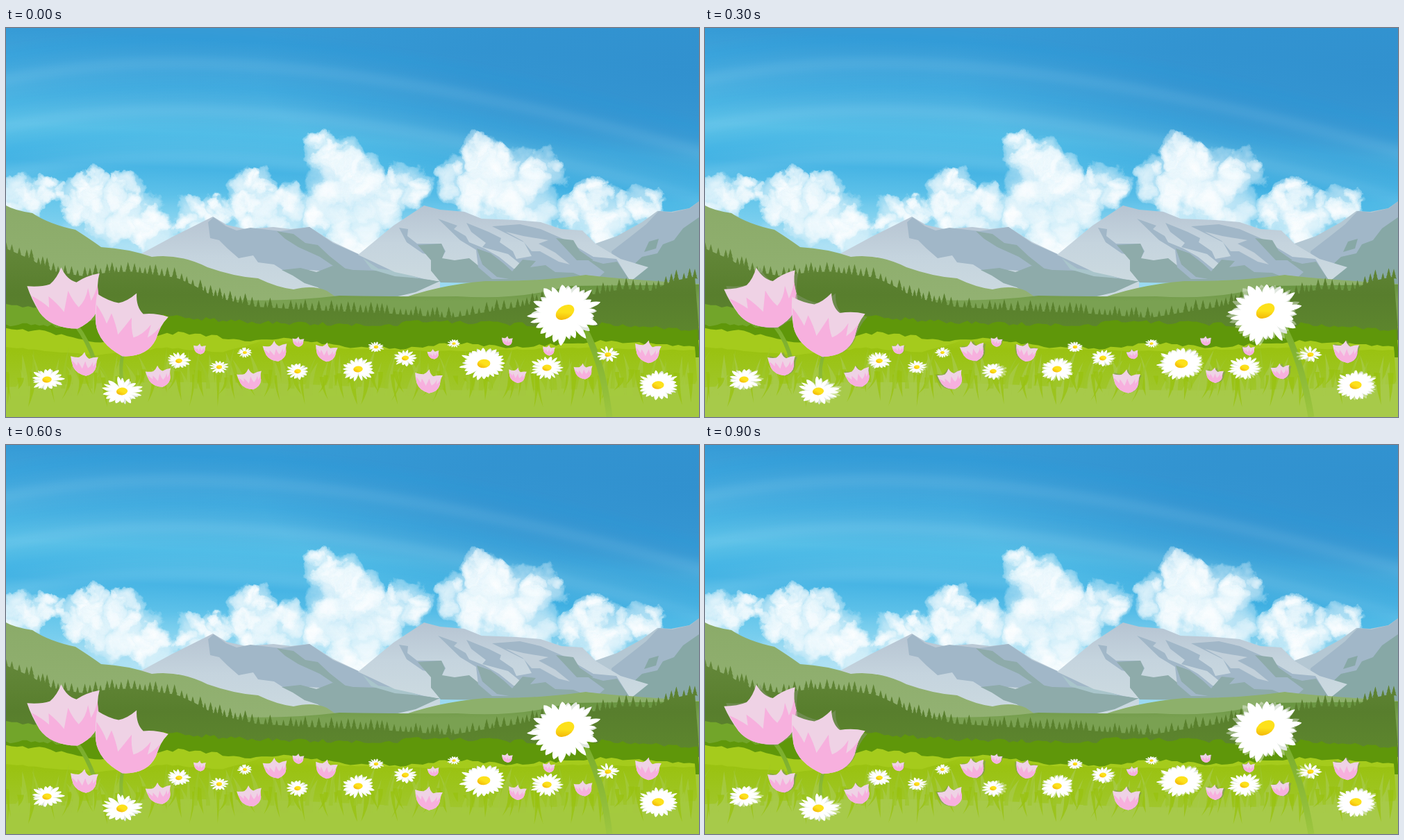
These frames come from a looping animation (998x561 px, 1 s). An HTML page:

```html
<!DOCTYPE html>
<html lang="en">
<head>
<meta charset="utf-8">
<title>Spring meadow</title>
<style>
  html, body { margin: 0; width: 100%; height: 100%; overflow: hidden; background: #a4c93f; }
  svg { position: absolute; left: 0; top: 0; width: 100%; height: 100%; }
</style>
</head>
<body>
<svg viewBox="0 0 998 561" preserveAspectRatio="none">
  <defs>
    <linearGradient id="sky" x1="0" y1="0" x2="0" y2="325" gradientUnits="userSpaceOnUse" gradientTransform="rotate(3)">
      <stop offset="0" stop-color="#369bd6"/><stop offset=".15" stop-color="#40a6dc"/>
      <stop offset=".28" stop-color="#4bb1e1"/><stop offset=".42" stop-color="#57bfe7"/>
      <stop offset=".58" stop-color="#46b4e4"/><stop offset=".78" stop-color="#6cc9ec"/>
      <stop offset="1" stop-color="#9bdaf2"/>
    </linearGradient>
    <radialGradient id="deep" cx="998" cy="60" r="640" gradientUnits="userSpaceOnUse" gradientTransform="matrix(1 0 0 .3 0 42)">
      <stop offset="0" stop-color="#3191cf"/><stop offset=".5" stop-color="#3191cf" stop-opacity=".75"/>
      <stop offset="1" stop-color="#3191cf" stop-opacity="0"/>
    </radialGradient>
    <radialGradient id="puff">
      <stop offset="0" stop-color="#fff" stop-opacity=".62"/><stop offset=".65" stop-color="#f4fbfe" stop-opacity=".5"/>
      <stop offset=".9" stop-color="#e4f5fc" stop-opacity=".34"/><stop offset="1" stop-color="#dff3fb" stop-opacity="0"/>
    </radialGradient>
    <linearGradient id="haze" x1="0" y1="0" x2="0" y2="1">
      <stop offset="0" stop-color="#fff" stop-opacity="0"/><stop offset="1" stop-color="#fff" stop-opacity=".6"/>
    </linearGradient>
    <linearGradient id="rock" x1="0" y1="0" x2="0" y2="1">
      <stop offset="0" stop-color="#b6c4d2"/><stop offset=".5" stop-color="#c5d4de"/><stop offset="1" stop-color="#ccdae0"/>
    </linearGradient>
    <linearGradient id="hill" x1="0" y1="0" x2="0" y2="1">
      <stop offset="0" stop-color="#8bab69"/><stop offset="1" stop-color="#93b273"/>
    </linearGradient>
    <linearGradient id="dale" x1="0" y1="0" x2="0" y2="1">
      <stop offset="0" stop-color="#67943f"/><stop offset=".4" stop-color="#7aa152"/><stop offset="1" stop-color="#7aa152"/>
    </linearGradient>
    <linearGradient id="wood" x1="0" y1="300" x2="0" y2="440" gradientUnits="userSpaceOnUse">
      <stop offset="0" stop-color="#66893c"/><stop offset=".6" stop-color="#587e2d"/><stop offset="1" stop-color="#5d862d"/>
    </linearGradient>
    <linearGradient id="field" x1="0" y1="440" x2="0" y2="561" gradientUnits="userSpaceOnUse">
      <stop offset="0" stop-color="#a6cb1a"/><stop offset=".2" stop-color="#9ac211"/>
      <stop offset=".4" stop-color="#9cc41b"/><stop offset="1" stop-color="#a4c93f"/>
    </linearGradient>
    <linearGradient id="stem" x1="0" y1="430" x2="0" y2="561" gradientUnits="userSpaceOnUse">
      <stop offset="0" stop-color="#78ac2c"/><stop offset="1" stop-color="#9dc640"/>
    </linearGradient>
    <linearGradient id="yolk" x1="1" y1="0" x2="0" y2="1">
      <stop offset=".5" stop-color="#fde11b"/><stop offset="1" stop-color="#efa700"/>
    </linearGradient>
    <filter id="fluff" x="-5%" y="-20%" width="110%" height="140%">
      <feTurbulence type="fractalNoise" baseFrequency=".035" numOctaves="4" seed="8"/>
      <feDisplacementMap in="SourceGraphic" scale="30" xChannelSelector="R" yChannelSelector="G"/>
    </filter>
    <filter id="soft" x="-5%" y="-20%" width="110%" height="140%"><feGaussianBlur stdDeviation="5"/></filter>
  </defs>
  <g id="scene"></g>
</svg>
<svg viewBox="0 0 998 561" preserveAspectRatio="none"><g id="poseA"></g><g id="poseB"></g></svg>
<script>
let seed = 1;
const rand = (a = 0, b = 1) => {
  seed = (seed * 16807) % 2147483647;
  return a + (b - a) * seed / 2147483647;
};
const n1 = v => v.toFixed(1);
const path = (d, fill, more = '') => `<path d="${d}" fill="${fill}" ${more}/>`;
const times = (n, f) => Array.from({ length: n }, (_, i) => f(i)).join('');

// height of a polyline [x, y, x, y, ...] at x
function level(pts, x) {
  let i = 0;
  while (i < pts.length - 4 && pts[i + 2] < x) i += 2;
  const [x0, y0, x1, y1] = pts.slice(i, i + 4);
  return y0 + (y1 - y0) * (x - x0) / (x1 - x0);
}

function band(pts, floor, fill, rough = 0, step = 8) {
  const end = pts[pts.length - 2];
  let d = `M${pts[0]} ${floor}`;
  for (let x = pts[0]; x <= end; x += step) d += `L${x} ${n1(level(pts, x) + rand(-rough, rough))}`;
  return path(d + `L${end} ${floor}Z`, fill);
}

// conifers standing along a line
function forest(pts, floor, fill, tall) {
  let out = band(pts, floor, fill);
  for (let x = pts[0]; x < pts[pts.length - 2]; x += rand(6, 11)) {
    const y = level(pts, x), h = tall * rand(.5, 1.1), w = h * .38;
    let left = '', right = '';
    for (let k = 1; k < 5; k++) {
      const a = w * k / 4, yy = y - h + h * k / 3;
      right += `L${n1(x + a)} ${n1(yy)}L${n1(x + a * .65)} ${n1(yy - 1)}`;
      left = `L${n1(x - a * .65)} ${n1(yy - 1)}L${n1(x - a)} ${n1(yy)}` + left;
    }
    out += path(`M${n1(x)} ${n1(y - h)}${right}${left}Z`, fill);
  }
  return out;
}

function sky() {
  const streaks = times(6, i => {
    const y = 25 + i * 34;
    return `<path d="M-20 ${y + 20}C250 ${y - 45} 600 ${y + 5} 1018 ${y + 125}" fill="none" stroke="${i % 2 ? '#fff' : '#2c9bd8'}" stroke-width="18" opacity=".07"/>`;
  });
  return `<rect width="998" height="400" fill="url(#sky)"/><rect width="998" height="300" fill="url(#deep)"/>
    <g filter="url(#soft)">${streaks}</g>`;
}

const puffs = [
  20, 250, 38, 62, 232, 24, 108, 244, 36, 128, 230, 26, 172, 234, 31, 150, 268, 42, 195, 275, 38, 215, 295, 34,
  268, 274, 30, 300, 265, 24, 345, 232, 30, 365, 219, 22, 352, 262, 38, 400, 262, 40, 455, 172, 27, 484, 180, 30,
  475, 215, 44, 515, 210, 32, 530, 250, 50, 578, 228, 36, 465, 260, 42, 505, 298, 42, 680, 178, 27, 702, 190, 32,
  655, 218, 38, 725, 215, 48, 772, 206, 34, 690, 255, 46, 750, 250, 48, 838, 240, 30, 825, 265, 32, 870, 265, 38, 920, 255, 30, 860, 292, 32
];
function clouds() {
  let out = '';
  for (let i = 0; i < puffs.length; i += 3) {
    const [x, y, r] = puffs.slice(i, i + 3);
    const puff = (px, py, pr) => `<circle cx="${n1(px)}" cy="${n1(py)}" r="${n1(pr)}" fill="url(#puff)"/>`;
    out += puff(x, y, r);
    out += times(9, () => {
      const a = rand(0, 6.28), q = r * rand(.3, .75);
      return puff(x + q * Math.cos(a), y + q * Math.sin(a), r * rand(.25, .48));
    });
  }
  return `<g filter="url(#fluff)">${out}</g><ellipse cx="510" cy="290" rx="430" ry="55" fill="url(#haze)" filter="url(#soft)" opacity=".65"/>`;
}

function mountains() {
  const blue = '#a1b7c8', teal = '#8eabaa';
  return [
    ['M840 314L880 300L916 280L938 264L958 265L984 260L998 250V370H830Z', '#b4c7d3'],
    ['M872 322L898 302L922 283L940 264L960 266L985 260L998 250V360H875Z', blue],
    ['M998 273L975 289L962 306L946 312L938 325L916 330L900 345L850 350V370H998Z', '#87a8a6'],
    ['M919 323L926 308L940 304L936 318Z', '#87a8a6'],
    ['M190 328L240 301L298 272L318 284L345 290L385 287L410 290L437 287L470 308L510 327L560 350L625 366V390H190Z', 'url(#rock)'],
    ['M291 280L299 273L317 286L332 292L352 288L395 293L437 287L471 310L514 329L560 351L610 364L520 362L480 352L438 349L400 350L386 341L363 338L356 328L335 332L319 318L307 306L294 303Z', blue],
    ['M390 293L414 297L431 310L449 313L466 329L490 348L474 345L452 330L421 316L402 304Z', teal],
    ['M397 349L424 346L447 352L470 343L500 349L538 350L570 358L625 365L590 381L560 388H470L449 374L430 368L413 357Z', teal],
    ['M514 332L536 347L568 351L596 361L560 358L526 348Z', '#a9c5cb'],
    ['M507 327L558 285L602 256L625 262L660 265L685 275L735 277L770 280L800 290L830 292L850 312L885 333L925 345L900 365H620L560 352Z', 'url(#rock)'],
    ['M566 288L579 290L578 300L592 311L627 311L633 322L628 331L600 325L577 309Z', blue],
    ['M593 313L627 311L632 322L628 332L646 335L667 332L688 349L720 357L760 363L700 368L626 367L612 350L612 335Z', teal],
    ['M622 275L650 285L645 290L662 300L667 309L689 318L710 330L731 347L750 348L723 326L686 316L691 310L670 294L663 281L695 294L713 303L711 309L730 322L735 333L757 329L746 309L724 298L700 286L740 283L770 290L802 304L846 330L879 333L897 362H700L680 345L677 320L654 306Z', blue],
    ['M678 318L698 325L716 339L729 351L744 334L763 336L755 345L777 342L791 352L817 353L834 360L760 368L707 359L686 341Z', teal],
    ['M720 294L745 300L781 306L767 311L791 324L812 341L796 337L769 322L757 322L744 307Z', '#c2d0da'],
    ['M792 303L817 306L826 321L846 335L822 335L808 320Z', teal],
    ['M836 333L860 340L880 337L897 362L850 363L862 352Z', teal]
  ].map(([d, fill]) => path(d, fill)).join('');
}

const scene = () => sky() + clouds() + mountains() +
  path('M0 256Q12 263 38 267Q62 283 100 291Q122 305 137 316Q175 318 210 330Q250 325 290 345Q330 359 363 361Q390 374 414 377Q442 370 462 379L500 405H0Z', 'url(#hill)') +
  path('M560 394Q618 371 690 365Q767 366 835 356Q870 361 998 369V420H560Z', '#8db06b') +
  path('M330 392Q405 395 480 386Q570 388 650 387Q740 393 810 372L998 370V430H330Z', 'url(#dale)') +
  forest([0, 318, 30, 331, 65, 350, 110, 358, 145, 353, 180, 351, 245, 360, 270, 371, 300, 388, 360, 402, 440, 407, 540, 411, 640, 418, 690, 410, 740, 402, 790, 390, 855, 383, 890, 376, 930, 379, 960, 365, 999, 357], 450, 'url(#wood)', 15) +
  band([0, 400, 75, 405, 145, 410, 240, 421, 330, 427], 455, '#72a52a', 2) +
  band([0, 427, 75, 430, 130, 421, 215, 418, 230, 415, 330, 423, 430, 426, 555, 429, 590, 423, 690, 425, 780, 429, 870, 427, 999, 437], 475, '#5f970a', 3, 6) +
  band([0, 434, 60, 438, 125, 454, 190, 448, 250, 439, 305, 445, 345, 453, 400, 446, 485, 459, 570, 462, 650, 454, 730, 461, 860, 451, 999, 460], 561, '#a5cb1c', 2) +
  band([0, 460, 130, 472, 230, 461, 310, 468, 370, 451, 430, 452, 490, 463, 660, 466, 820, 461, 999, 465], 561, 'url(#field)', 1);

function grass(lean) {
  seed = 41;
  const blade = (x, y, tx, ty, w, fill) =>
    path(`M${n1(x - w)} ${n1(y)}Q${n1(x - w * .4)} ${n1((y + ty) / 2)} ${n1(tx)} ${n1(ty)}Q${n1(x + w)} ${n1((y + ty) / 2)} ${n1(x + w)} ${n1(y)}Z`, fill, 'opacity=".75"');
  const light = lean ? '#a7ca4a' : '#a4c93f';
  return path(`M0 518Q250 504 500 517T998 513V561H0Z`, light) +
    times(95, i => {
      const x = i * 10.7 + rand(-7, 7);
      return blade(x, 530, x + rand(-16, 16) + lean, rand(463, 502), rand(3, 8), light);
    }) +
    times(85, i => {
      const x = i * 12 + rand(-8, 8);
      return blade(x + rand(-14, 14) + lean * .5, rand(492, 506), x, rand(512, 547), rand(2, 5), '#98c10f');
    }) +
    times(28, i => {
      const x = i * 37 + rand(-15, 15);
      return blade(x, 520, x + rand(-20, 20) + lean, rand(458, 480), 3, '#9ec62b');
    });
}

const cup = 'M-53 0Q-34 5 -20 3Q-9 -3 0 -18Q5 1 18 7Q34 0 53 0Q45 16 46 36Q42 64 8 73Q-30 66 -42 40Q-50 20 -53 0Z';
const flame = 'M-49 15Q-37 24 -27 36L-25 20Q-14 33 -7 46Q-2 33 4 17Q8 33 15 43Q27 35 33 18L34 37Q42 28 47 16L46 36Q42 64 8 73Q-30 66 -42 40Z';
// x, y, width, angle, sway
const tulips = [
  113, 474, 40, 2, -3, 219, 493, 37, -8, -1, 279, 458, 18, 2, -1, 387, 457, 35, -6, -3, 421, 448, 17, 4, -1,
  462, 459, 32, 8, 2, 350, 497, 36, -8, 2, 609, 499, 40, 6, -2, 615, 466, 17, -5, 0, 722, 447, 16, 4, -1,
  782, 460, 18, 5, 1, 737, 494, 26, 8, -3, 831, 488, 27, -3, -3, 925, 457, 38, 6, -2,
  82.5, 363, 106, -10, -4, 182.5, 400, 108, 18, -4.5
];
function tulip([x, y, w, a, sway], swung) {
  const at = (dx, da) => `transform="translate(${x + dx} ${y}) rotate(${a + da}) scale(${w / 106})"`;
  const tilt = x > 400 && x < 480 ? 4 : -5;
  const ghost = swung ? path(cup, '#7e9364', at(0, 0) + ' opacity=".6"') : '';
  return ghost + `<g ${at(swung * sway, swung * tilt)}>${path(cup, '#efd2e5')}${path(flame, '#f7b0de')}</g>`;
}

// x, y, radius, petals, sway
const daisies = [
  59, 507, 25, 15, -3, 167, 524, 30, 17, -4, 249, 480, 18, 16, 2, 307, 489, 15, 13, -2, 344, 468, 11, 13, -2,
  420, 495, 18, 14, -5, 507, 492, 25, 18, 0, 533, 460, 12, 14, 0, 575, 476, 19, 14, -2, 688, 484, 35, 24, -2,
  645, 455, 10, 13, -2, 779, 490, 25, 19, -2, 867, 471, 17, 11, 5, 939, 515, 32, 23, -2, 805, 411, 53, 26, 2
];
function daisy([x, y, r, count, sway], swung) {
  const big = r > 50, squash = big ? .84 : .7;
  const petals = (dx, da, fade) => {
    seed = Math.round(x * 97);
    const ring = (fill, k) => times(count, i => {
      const len = r * rand(.8, 1.05) * k, w = r * rand(.09, .15), turn = (i + rand(-.25, .25)) * 360 / count;
      return path(`M0 0C${n1(len * .5)} ${n1(-w * 1.4)} ${n1(len * .85)} ${n1(-w)} ${n1(len)} 0C${n1(len * .9)} ${n1(w)} ${n1(len * .5)} ${n1(w * 1.2)} 0 0Z`, fill, `transform="rotate(${n1(turn)})"`);
    });
    return `<g opacity="${fade}" transform="translate(${x + dx} ${y}) rotate(${big ? -15 : 0}) scale(1 ${squash}) rotate(${da})">${ring('#e0e7df', .9)}${ring('#fff', 1)}</g>`;
  };
  const dx = swung * sway, cy = y - (big ? 1 + swung * 2 : 0);
  return (swung ? petals(0, 0, .4) : '') + petals(dx, swung * 7, 1) +
    `<ellipse rx="${r * .27}" ry="${r * .18}" fill="url(#yolk)" transform="translate(${x + dx} ${cy}) rotate(${big ? -30 : -5})"/>`;
}

const stalk = (d, w) => `<path d="${d}" fill="none" stroke="url(#stem)" stroke-width="${w}"/>`;
const rows = list => Array.from({ length: list.length / 5 }, (_, i) => list.slice(i * 5, i * 5 + 5));

const pose = swung => grass(swung * 4) +
  stalk(`M${102 - swung} 430Q117 450 ${128 - swung * 3} 481`, 6) +
  stalk(`M${168 + swung * 3} 470Q164 490 167 508`, 5) +
  stalk(`M${834 + swung * 2} 436Q860 484 ${869 + swung * 4} 561`, 9) +
  rows(tulips).map(t => tulip(t, swung)).join('') +
  rows(daisies).map(d => daisy(d, swung)).join('');

const get = id => document.getElementById(id);
get('scene').innerHTML = scene();
get('poseA').innerHTML = pose(0);
get('poseB').innerHTML = pose(1);

function draw() {
  const swung = Math.floor(performance.now() / 100) % 2;
  get('poseA').style.display = swung ? 'none' : '';
  get('poseB').style.display = swung ? '' : 'none';
  requestAnimationFrame(draw);
}
draw();
</script>
</body>
</html>
```
